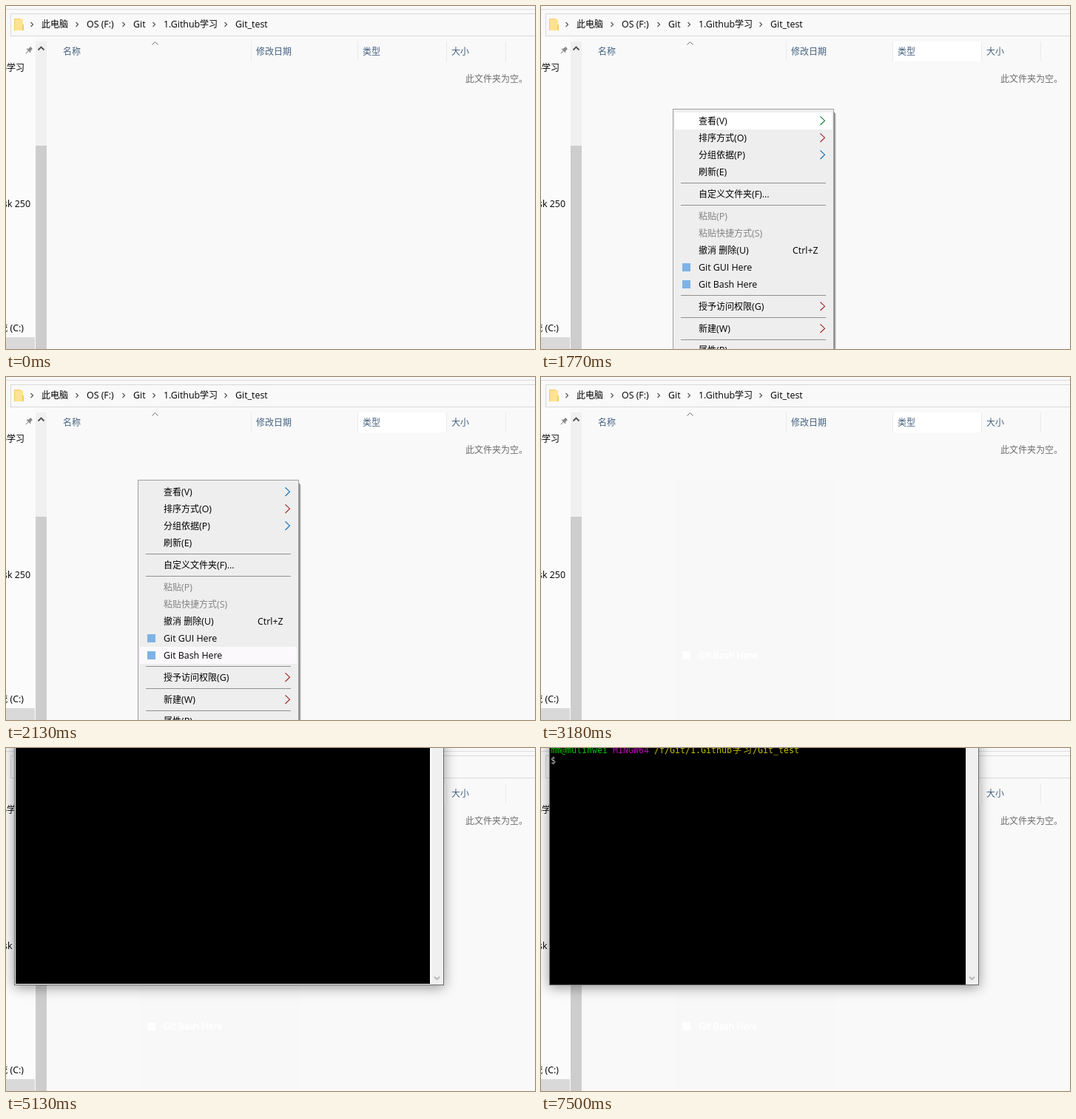
An HTML page with a canvas for the animation above (8000 ms loop, 715 by 464 pixels).

```html
<!DOCTYPE html>
<html lang="zh-CN">
<head>
<meta charset="utf-8">
<title>Git Bash Here</title>
<style>
html, body { margin: 0; width: 100%; height: 100%; overflow: hidden; background: #f9f9f9; }
canvas { display: block; }
</style>
</head>
<body>
<canvas id="stage" width="715" height="464"></canvas>
<script>
const ctx = document.getElementById('stage').getContext('2d');
const LOOP = 8000;
const LATIN = '12.4px "Open Sans", "Noto Sans", sans-serif';
const CJK = '12px "Noto Sans CJK SC", "Noto Sans CJK", sans-serif';
const MONO = '11.65px "DejaVu Sans Mono", monospace';
const isCjk = s => /[\u3000-\u9fff]/.test(s);

// When set, everything is drawn as a white imprint.
let ghost = false;
const ink = color => ghost ? '#fff' : color;

function box(x, y, w, h, color) {
  ctx.fillStyle = ink(color);
  ctx.fillRect(x, y, w, h);
}

function line(points, color, width = 1) {
  ctx.strokeStyle = ink(color);
  ctx.lineWidth = width;
  ctx.beginPath();
  points.forEach(([x, y]) => ctx.lineTo(x, y));
  ctx.stroke();
}

function frame(x, y, w, h, color) {
  ctx.strokeStyle = ink(color);
  ctx.lineWidth = 1;
  ctx.strokeRect(x + 0.5, y + 0.5, w - 1, h - 1);
}

// Mixed Chinese and Latin text, y is the middle of the line.
function label(str, x, y, color = '#000', right = false) {
  const runs = str.match(/[\u3000-\u9fff]+|[^\u3000-\u9fff]+/g).map(s => {
    const font = isCjk(s) ? CJK : LATIN;
    ctx.font = font;
    return { s, font, w: ctx.measureText(s).width };
  });
  if (right) x -= runs.reduce((sum, r) => sum + r.w, 0);
  ctx.fillStyle = ctx.strokeStyle = ink(color);
  ctx.lineWidth = 0.7;
  for (const r of runs) {
    ctx.font = r.font;
    ctx.fillText(r.s, x, y + 4);
    if (ghost) ctx.strokeText(r.s, x, y + 4);
    x += r.w;
  }
}

function pin() {
  ctx.save();
  ctx.translate(31, 60);
  ctx.rotate(Math.PI / 4);
  box(-2, -5, 4, 5, '#8a8a8a');
  box(-3.5, -0.5, 7, 1.6, '#8a8a8a');
  box(-0.5, 1, 1, 5, '#8a8a8a');
  ctx.restore();
}

function folder() {
  box(11, 17, 9, 16, '#f3cd62');
  box(12, 18, 11, 15, '#ffe391');
  box(22, 25, 2, 8, '#f3cd62');
}

function explorer(hover) {
  if (!ghost) {
    box(0, 0, 715, 464, '#f9f9f9');
    box(0, 42, 40, 422, '#fbfbfb');
  }
  box(0, 4, 715, 1, '#dedede');
  frame(6, 10, 720, 31, '#d9d9d9');
  folder();
  for (const x of [35, 96, 159, 200, 297]) {
    line([[x - 1.5, 22], [x + 1.5, 25], [x - 1.5, 28]], '#555', 1.2);
  }
  label('此电脑', 48, 25);
  label('OS (F:)', 109, 25);
  label('Git', 172, 25);
  label('1.Github学习', 213, 25);
  label('Git_test', 310, 25);

  if (hover) {
    ctx.globalAlpha *= hover;
    box(476, 48, 119, 27, '#fff');
    ctx.globalAlpha /= hover;
  }
  for (const x of [331, 475, 595, 675]) box(x, 48, 1, 27, '#ebebeb');
  line([[197.5, 52.5], [201.5, 48.5], [205.5, 52.5]], '#6b6b6b');
  label('名称', 77, 62, '#44607f');
  label('修改日期', 338, 62, '#44607f');
  label('类型', 482, 62, '#44607f');
  label('大小', 602, 62, '#44607f');
  label('此文件夹为空。', 621, 99, '#6d6d6d');

  pin();
  label('b学习', 25, 84, '#000', true);
  label('sk 250', 33, 268, '#000', true);
  label('统 (C:)', 24, 436, '#000', true);
  box(0, 448, 39, 16, '#d9d9d9');
  box(40, 48, 15, 416, '#f0f0f0');
  box(40, 189, 15, 275, '#cdcdcd');
  line([[43.5, 59.5], [47.5, 55.5], [51.5, 59.5]], '#505050', 1.8);
}

const GREY = '#838383', BLUE = '#0b6fb4', RED = '#a32626';
const items = [
  { y: 156, text: '查看(V)', arrow: BLUE },
  { y: 179, text: '排序方式(O)', arrow: RED },
  { y: 202, text: '分组依据(P)', arrow: BLUE },
  { y: 225, text: '刷新(E)' },
  { y: 255, text: '自定义文件夹(F)...' },
  { y: 285, text: '粘贴(P)', color: GREY },
  { y: 308, text: '粘贴快捷方式(S)', color: GREY },
  { y: 331, text: '撤消 删除(U)', keys: 'Ctrl+Z' },
  { y: 354, text: 'Git GUI Here', icon: true },
  { y: 377, text: 'Git Bash Here', icon: true },
  { y: 407, text: '授予访问权限(G)', arrow: RED },
  { y: 437, text: '新建(W)', arrow: RED },
  { y: 466, text: '属性(R)' }
];
const BASH = 9;

function drawItem(i, lit) {
  const { y, text, color, arrow, keys, icon } = items[i];
  if (lit) box(181, y - 12, 212, 23, i === BASH ? '#fbf9fb' : '#fff');
  label(text, 213, y, color);
  if (keys) label(keys, 340, y);
  if (icon) box(191, y - 6, 11, 11, '#7fb2e5');
  if (arrow) {
    const tint = lit ? '#16803c' : arrow;
    line([[377.5, y - 6.5], [383.5, y - 0.8], [377.5, y + 5]], tint, 1.1);
  }
}

function menu(alpha, lit) {
  [0.48, 0.28, 0.12].forEach((a, i) => box(396 + i, 144 + i, 1, 320, `rgba(0,0,0,${a})`));
  ctx.globalAlpha = alpha;
  box(178, 139, 218, 325, '#eeeeee');
  frame(178, 139, 218, 340, '#a0a0a0');
  for (const y of [239, 269, 391, 421, 451]) box(189, y, 196, 1, '#919191');
  items.forEach((_, i) => drawItem(i, i === lit));
  ctx.globalAlpha = 1;
}

// What stays behind once the menu has closed.
function imprint() {
  box(180, 140, 218, 324, '#f8f8f8');
  ghost = true;
  drawItem(BASH, false);
  ghost = false;
}

function prompt(cursor) {
  let x = 13;
  const put = (str, color, base) => {
    ctx.fillStyle = color;
    for (const ch of str) {
      const wide = isCjk(ch);
      ctx.font = wide ? CJK : MONO;
      ctx.fillText(ch, x + (wide ? 1 : 0), base);
      x += wide ? 14 : 7;
    }
  };
  put('mm@mulinwei ', '#00bf00', 7);
  put('MINGW64 ', '#bf00bf', 7);
  put('/f/Git/1.Github学习/Git_test', '#bfbf00', 7);
  x = 13;
  put('$', '#bfbfbf', 21);
  if (cursor) box(27, 11, 1, 14, '#bfbfbf');
}

function terminal(t) {
  ctx.save();
  ctx.globalAlpha = t < 4290 ? 0.5 : 1;
  ctx.shadowColor = 'rgba(0,0,0,0.4)';
  ctx.shadowBlur = 16;
  ctx.shadowOffsetY = 3;
  box(11, -20, 581, 341, '#6b6b6b');
  ctx.shadowColor = 'transparent';
  box(12, -20, 579, 340, '#f9f9f9');

  if (t < 5130) {
    ctx.save();
    ctx.beginPath();
    ctx.rect(12, 0, 563, 320);
    ctx.clip();
    box(180, 140, 218, 180, '#f8f8f8');
    box(12, 0, 563, 5, '#fff');
    ghost = true;
    explorer(1);
    ghost = false;
    ctx.restore();
  } else if (t < 5160) {
    box(12, 0, 563, 320, '#fff');
    box(13, 0, 560, 319, '#000');
  } else {
    box(12, 0, 562, 320, '#000');
  }
  const edge = t < 5160 ? 575 : 574;
  box(edge, 0, 591 - edge, 320, '#f0f0f0');
  line([[579, 309.5], [582.5, 313], [586, 309.5]], '#b8b8b8', 2);
  if (t >= 7020) prompt(t < 7500);
  ctx.restore();
}

function draw(t) {
  explorer(t < 120 ? 0 : t < 150 ? 0.5 : 1);
  if (t >= 1290 && t < 2940) {
    const fade = Math.min(1, 0.22 + 0.195 * Math.floor((t - 1290) / 30));
    const step = Math.min(8, Math.floor((t - 1770) / 45));
    menu(fade, t < 1770 ? -1 : Math.round(step * BASH / 8));
  }
  if (t >= 2940) {
    imprint();
    const left = 8 - Math.floor((t - 2940) / 30);
    if (left > 0) {
      ctx.globalAlpha = left / 8;
      drawItem(BASH, true);
      ctx.globalAlpha = 1;
    }
  }
  if (t >= 4260) terminal(t);
}

const start = performance.now();
function tick() {
  draw((performance.now() - start) % LOOP);
  requestAnimationFrame(tick);
}
tick();
</script>
</body>
</html>
```
